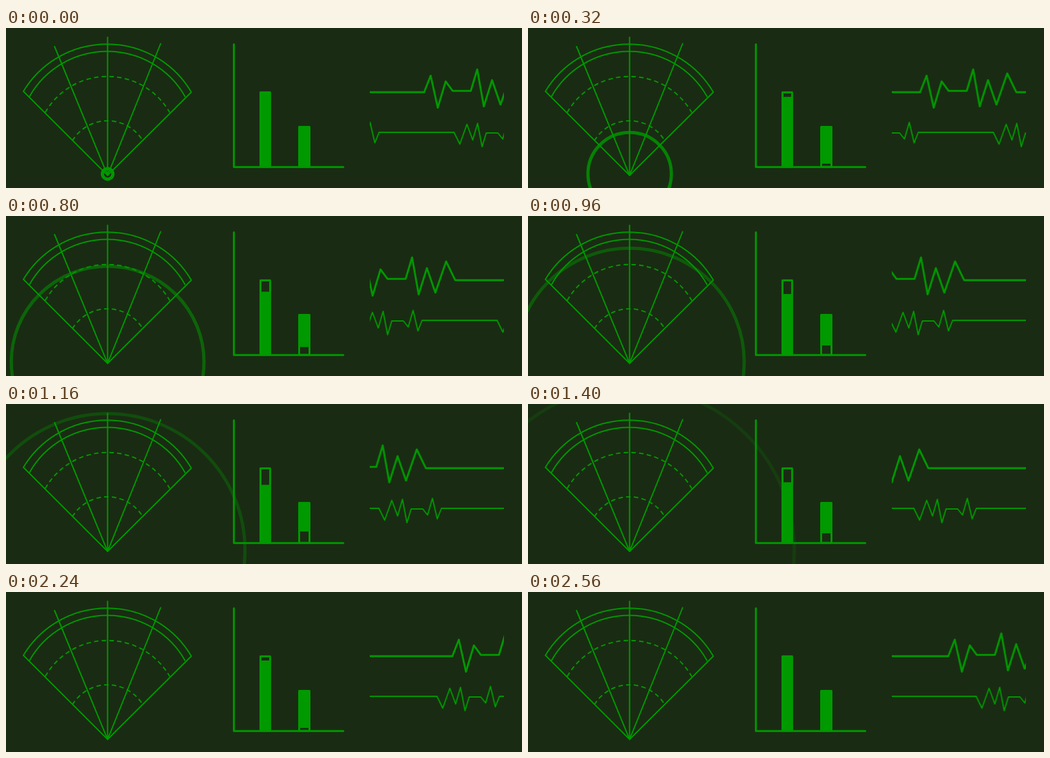
These frames come from a looping animation (800 px wide and 250 px high, 2.6 s). An HTML page:

```html
<!DOCTYPE html>
<html lang="en">
<head>
<meta charset="utf-8">
<title>Radar panel</title>
<style>
  html, body { margin: 0; width: 100%; height: 100%; overflow: hidden; background: #1a2b13; }
  svg { display: block; }
  .line { fill: none; stroke: #090; stroke-width: 2; stroke-linecap: round; stroke-linejoin: round; }
  .bold { stroke-width: 3; }
  .dash { stroke-dasharray: 7 5; stroke-linecap: butt; }
  .fill { fill: #090; }

  .ping, .fill, .wave { animation: 2600ms linear infinite; }
  .ping { stroke-width: 5; animation-name: ping; }
  .drop { animation-name: drop; }
  .lift { animation-name: lift; }
  .left { animation-name: left; }
  .right { animation-name: right; }

  @keyframes ping {
    0% { r: 8px; opacity: 1; }
    65% { r: 306.3px; opacity: 0; }
    100% { r: 306.3px; opacity: 0; }
  }
  @keyframes drop {
    0%, 100% { y: 100.5px; height: 116.5px; }
    45% { y: 126.5px; height: 90.5px; }
  }
  @keyframes lift {
    0%, 100% { height: 62.5px; }
    45% { height: 44.5px; }
  }
  @keyframes left { to { transform: translateX(-328.4px); } }
  @keyframes right { to { transform: translateX(216.7px); } }
</style>
</head>
<body>
<svg width="800" height="250" viewBox="0 0 800 250">
  <defs>
    <clipPath id="screen"><rect x="564.5" y="40" width="207" height="170"/></clipPath>
    <path id="strong" d="M0 100L10 74.5 21 124.5 33.3 83.5 44.2 98.3H72.2L82.2 64.7 92.4 122.5 105.2 81.5 118.3 119.8 135 71 149 100.2H326.6"/>
    <path id="weak" d="M0 163L9 181.5 20 150.5 29 175 36.5 149 43.5 185.5 50 164H68L75.5 173.5 83 147.5 90.5 179.5 97 163H213.2"/>
  </defs>

  <!-- radar -->
  <circle class="line ping" cx="157.6" cy="228" r="8"/>
  <g class="line">
    <path d="M157.5 230.3L27 99A151 151 0 0 1 287.3 100.3Z"/>
    <path d="M36.5 107A138.3 138.3 0 0 1 277.5 107"/>
    <path d="M157.5 230.3V14.5M157.5 230.3L75.3 29M157.5 230.3L239.7 24.5"/>
    <path class="dash" d="M60.8 132A110.8 110.8 0 0 1 253.8 132"/>
    <path class="dash" d="M103 176A63.4 63.4 0 0 1 212 176"/>
  </g>

  <!-- bars -->
  <rect class="fill drop" x="394.5" y="100.5" width="15" height="116.5"/>
  <rect class="fill lift" x="454.5" y="154.5" width="16" height="62.5"/>
  <g class="line bold">
    <rect x="394.5" y="100.5" width="15" height="116.5"/>
    <rect x="454.5" y="154.5" width="16" height="62.5"/>
    <path d="M353.3 25.5V217.2H523"/>
  </g>

  <!-- pulses -->
  <g clip-path="url(#screen)">
    <g class="line bold wave left">
      <path d="M500 100.2H648.5"/>
      <use href="#strong" x="648.5"/>
      <use href="#strong" x="975.1"/>
    </g>
    <g class="line wave right">
      <path d="M330 163H481.3"/>
      <use href="#weak" x="481.3"/>
      <use href="#weak" x="694.5"/>
    </g>
  </g>
</svg>
</body>
</html>
```
